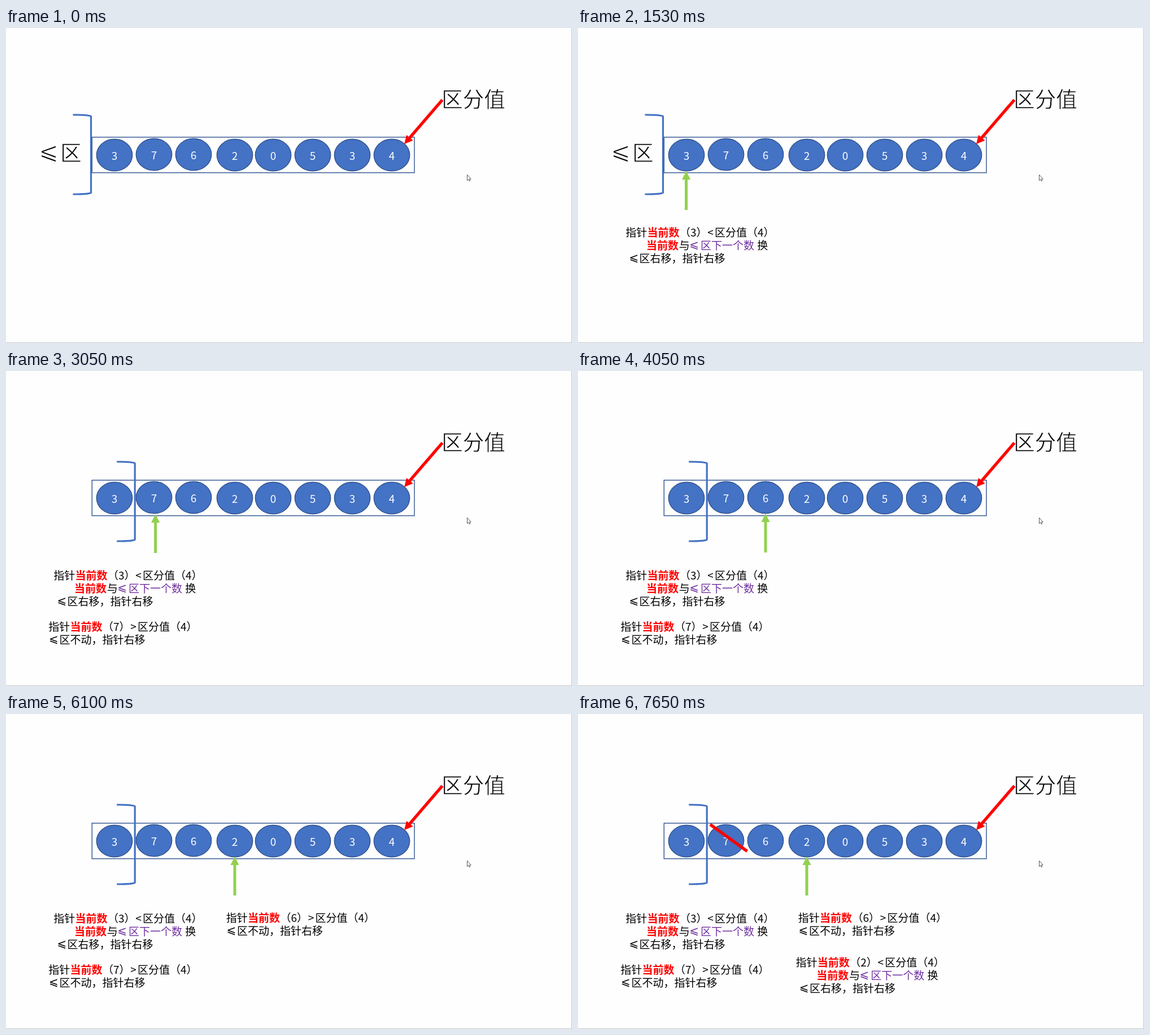
An HTML page that plays this animation: 1002 px wide and 559 px high, repeating every 8 s.

```html
<!DOCTYPE html>
<html lang="zh-CN">
<head>
<meta charset="utf-8">
<title>区分值</title>
<style>
html, body { margin: 0; width: 100%; height: 100%; overflow: hidden; background: #fefefe; }
svg { display: block; width: 1002px; height: 559px; }
text { font: 400 19px "Noto Sans CJK SC", "Noto Sans CJK", sans-serif; white-space: pre; }
.big { font-size: 37.5px; font-weight: 300; stroke: #fefefe; stroke-width: .8; }
.le { font: 400 20px "DejaVu Sans", sans-serif; }
.le.wide { font-size: 42px; stroke: #fefefe; stroke-width: 1.4; }
.key { font-weight: 700; fill: #f00; }
.next { fill: #7030a0; }
.ball { fill: #4472c4; stroke: #2f528f; stroke-width: 1.4; }
.balls text { fill: #fff; text-anchor: middle; }
.bracket { fill: none; stroke: #4472c4; stroke-width: 3.2; }
.pointer { fill: #92d050; }

/* hard cuts on one 8 s clock: 1% = 80 ms */
.cut { animation: 8s step-end infinite; }
#begin { animation-name: begin; }
#moved { animation-name: moved; }
#at3 { animation-name: at3; }
#at7 { animation-name: at7; }
#at6 { animation-name: at6; }
#at2 { animation-name: at2; }
#note3 { animation-name: note3; }
#note7 { animation-name: note7; }
#note6 { animation-name: note6; }
#note2 { animation-name: note2; }
#strike { animation-name: strike; }
#click { animation-name: click; }
@keyframes begin { 0% { opacity: 1 } 25.625%, 100% { opacity: 0 } }
@keyframes moved { 0% { opacity: 0 } 25.625%, 100% { opacity: 1 } }
@keyframes at3 { 0% { opacity: 0 } 12.875% { opacity: 1 } 25.625%, 100% { opacity: 0 } }
@keyframes at7 { 0% { opacity: 0 } 25.625% { opacity: 1 } 44.375%, 100% { opacity: 0 } }
@keyframes at6 { 0% { opacity: 0 } 50.625% { opacity: 1 } 63.375%, 100% { opacity: 0 } }
@keyframes at2 { 0% { opacity: 0 } 76.25%, 100% { opacity: 1 } }
@keyframes note3 { 0% { opacity: 0 } 19.125%, 100% { opacity: 1 } }
@keyframes note7 { 0% { opacity: 0 } 38.125%, 100% { opacity: 1 } }
@keyframes note6 { 0% { opacity: 0 } 57.125%, 100% { opacity: 1 } }
@keyframes note2 { 0% { opacity: 0 } 82.75%, 100% { opacity: 1 } }
@keyframes strike { 0% { opacity: 0 } 95.625%, 100% { opacity: 1 } }
@keyframes click {
  0%, 12.875%, 76.25%, 95.625%, 100% { opacity: 0 }
  6.625%, 70%, 89% { opacity: 1 }
}
</style>
</head>
<body>
<svg viewBox="0 0 1002 559">
  <defs>
    <path id="bracket" class="bracket" d="M118.5 154A32 2.6 0 0 1 150.5 156.6V292.4A32 2.6 0 0 1 118.5 295"/>
    <path id="pointer" class="pointer" d="M0 0L7.6 15H2.5V69H-2.5V15H-7.6Z"/>
    <ellipse id="ball" class="ball" rx="31.7" ry="28.2"/>
    <g id="head">
      <text>指针</text>
      <text x="38.2" class="key">当前数</text>
      <text x="157.7">区分值（4）</text>
    </g>
    <g id="swap">
      <text x="36.7" y="23" class="key">当前数</text>
      <text x="94.5" y="23">与</text>
      <text x="113" y="21" class="le next">⩽</text>
      <text x="132.7" y="23" class="next">区下一个数</text>
      <text x="233" y="23">换</text>
      <text x="6.2" y="44" class="le">⩽</text>
      <text x="24.3" y="46">区右移，指针右移</text>
    </g>
    <g id="stay">
      <text x=".8" y="21" class="le">⩽</text>
      <text x="19.3" y="23">区不动，指针右移</text>
    </g>
  </defs>

  <rect width="1002" height="559" fill="#fefefe"/>
  <path d="M1001.5 0V559M0 558.5H1002" stroke="#c4c4c4" fill="none"/>

  <rect x="152.3" y="193.7" width="570.7" height="63.1" fill="none" stroke="#2f528f" stroke-width="1.4"/>
  <g class="balls">
    <g transform="translate(192 225.5)"><use href="#ball"/><text y="8">3</text></g>
    <g transform="translate(262 224.5)"><use href="#ball"/><text y="8">7</text></g>
    <g transform="translate(332 224.5)"><use href="#ball"/><text y="8">6</text></g>
    <g transform="translate(405 225.5)"><use href="#ball"/><text y="8">2</text></g>
    <g transform="translate(473 225.5)"><use href="#ball"/><text y="8">0</text></g>
    <g transform="translate(543 225.5)"><use href="#ball"/><text y="8">5</text></g>
    <g transform="translate(613 225.5)"><use href="#ball"/><text y="8">3</text></g>
    <g transform="translate(683 225.5)"><use href="#ball"/><text y="8">4</text></g>
  </g>

  <text x="771.3" y="140.4" class="big">区分值</text>
  <path d="M772.5 127.5L713 196.7" stroke="#f00" stroke-width="5.3"/>
  <path d="M705 206L720.5 199.5L709.1 189.7Z" fill="#f00"/>

  <g id="begin" class="cut">
    <use href="#bracket"/>
    <text x="57.7" y="232.5" class="le wide">⩽</text>
    <text x="96.2" y="235.2" class="big">区</text>
  </g>
  <g id="moved" class="cut"><use href="#bracket" x="77.7" y="7"/></g>

  <g id="at3" class="cut"><use href="#pointer" x="191.6" y="254"/></g>
  <g id="at7" class="cut"><use href="#pointer" x="264.6" y="254"/></g>
  <g id="at6" class="cut"><use href="#pointer" x="332" y="253"/></g>
  <g id="at2" class="cut"><use href="#pointer" x="405" y="253"/></g>

  <g id="note3" class="cut">
    <g transform="translate(84.3 370)">
      <use href="#head"/><text x="95.6">（3）</text><text x="145">&lt;</text>
      <use href="#swap"/>
    </g>
  </g>
  <g id="note7" class="cut">
    <g transform="translate(75.3 461)">
      <use href="#head"/><text x="95.6">（7）</text><text x="145">&gt;</text>
      <use href="#stay"/>
    </g>
  </g>
  <g id="note6" class="cut">
    <g transform="translate(389.8 369)">
      <use href="#head"/><text x="95.6">（6）</text><text x="145">&gt;</text>
      <use href="#stay"/>
    </g>
  </g>
  <g id="note2" class="cut">
    <g transform="translate(385.6 448)">
      <use href="#head"/><text x="95.6">（2）</text><text x="145">&lt;</text>
      <use href="#swap"/>
    </g>
  </g>

  <path id="strike" class="cut" d="M234 196L299.5 243.5" stroke="#f00" stroke-width="5.5"/>

  <path d="M816.5 260.5V270.7L818.8 268.6L820.3 271.8L821.8 271.1L820.4 268H823.2Z" fill="#fff" stroke="#444455" stroke-width=".9"/>
  <circle id="click" class="cut" cx="817" cy="261" r="6.3" fill="#ff0" fill-opacity=".47"/>
</svg>
</body>
</html>
```
